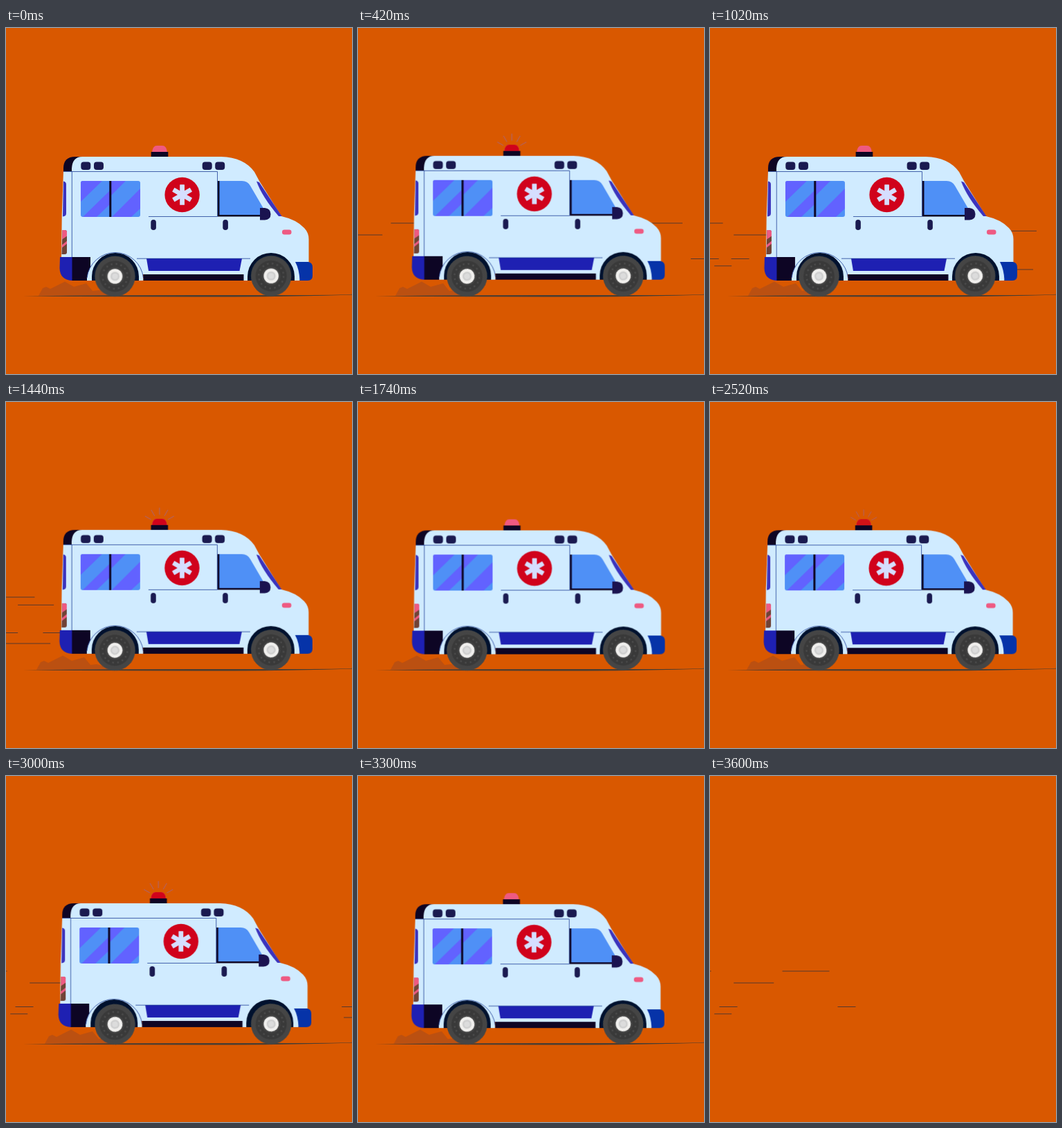
These frames come from a looping animation (500x500 px, 3.63 s). An HTML page:

```html
<!DOCTYPE html>
<html lang="en">
<head>
<meta charset="utf-8">
<title>Ambulance</title>
<style>
html, body { margin: 0; width: 100%; height: 100%; overflow: hidden; background: #d95800; }
svg { display: block; width: 500px; height: 500px; }
.light { fill: #d0ebff; }
.dark { fill: #0d0524; }
.navy { fill: #1a1a50; }
.blue { fill: #1e20b2; }
.indigo { fill: #3b33bd; }
.glass { fill: #4f90f6; }
.violet { fill: #6262ff; }
.pink { fill: #ee5a82; }
.red { fill: #d0021b; }
.arch { fill: #00112e; }
.seam { fill: none; stroke: #1f3f96; stroke-width: .8; }
.streaks { stroke: #55392f; stroke-width: 1; }
.rays { stroke: #a8667c; stroke-width: 1; }

#scene { animation: cut 3630ms step-end infinite; }
#van { animation: jolt 3630ms ease-in-out infinite; }
#dust { animation: drift 3630ms linear infinite; }
.spin { transform-box: fill-box; transform-origin: center; animation: spin 605ms linear infinite; }
.rays, #dome, #glow { animation: 518.571ms linear infinite; }
.rays { transform-origin: 222px 178px; animation-name: rays; }
#dome { animation-name: dome; }
#glow { animation-name: glow; }

@keyframes cut { 0% { visibility: visible } 99.17%, 100% { visibility: hidden } }
@keyframes jolt {
  0% { transform: translate(0, 0) }
  5.8% { transform: translate(.8px, -1.8px) }
  11.57% { transform: translate(.3px, -1.3px) }
  20% { transform: translate(-.8px, -.8px) }
  28.1% { transform: translate(.9px, 0) }
  34% { transform: translate(.4px, -.4px) }
  39.67% { transform: translate(-.2px, -1.2px) }
  48% { transform: translate(.5px, -.5px) }
  56.2% { transform: translate(.2px, -1.3px) }
  65% { transform: translate(.8px, -.4px) }
  74% { transform: translate(-.6px, -1.1px) }
  82.64% { transform: translate(-1.8px, -2.1px) }
  91% { transform: translate(-.3px, -.8px) }
  100% { transform: translate(0, 0) }
}
@keyframes drift {
  0% { transform: translateX(0) }
  11.57% { transform: translateX(7px) }
  28.1% { transform: translateX(8px) }
  39.67% { transform: translateX(-3px) }
  56.2% { transform: translateX(3px) }
  82.64% { transform: translateX(9px) }
  100% { transform: translateX(0) }
}
@keyframes spin { to { transform: rotate(360deg) } }
@keyframes rays {
  0%, 45% { transform: scale(.6); opacity: 0 }
  55% { transform: scale(.75); opacity: 1 }
  75%, 82% { transform: scale(1); opacity: 1 }
  93.3% { transform: scale(.75); opacity: .8 }
  96%, 100% { transform: scale(.6); opacity: 0 }
}
@keyframes dome {
  0%, 82% { opacity: 1 }
  93.3% { opacity: .5 }
  96.5%, 100% { opacity: 1 }
}
@keyframes glow {
  0%, 40% { opacity: 0 }
  52%, 86% { opacity: 1 }
  94%, 100% { opacity: 0 }
}
</style>
</head>
<body>
<svg viewBox="0 0 500 500">
  <defs>
    <g id="s0"><path d="M0 282H68M80 333.5H106"/></g>
    <g id="s1"><path d="M0 299H58M-28 343.8H-3"/></g>
    <g id="s2"><path d="M0 293.3H52M-26 333.5H0M-23 349H47"/></g>
    <g id="s3"><path d="M0 333.5H26"/></g>
    <g id="wheel">
      <circle r="29.2" fill="#454545"/>
      <circle r="22.5" fill="#393939"/>
      <circle r="18" fill="none" stroke="#4c4c4c" stroke-width="2.4" stroke-dasharray="2.4 4.683"/>
      <circle r="13.5" fill="#434343"/>
      <circle r="10.8" fill="#f1f0ee"/>
      <circle r="6.6" fill="#cfcfcf"/>
      <circle r="4" fill="#dcdcdc"/>
    </g>
    <rect id="lamp" class="navy" y="193.5" width="14" height="11.5" rx="4"/>
    <rect id="handle" class="navy" y="277" width="7.6" height="15" rx="3.8"/>
    <rect id="bar" x="-3.4" y="-14.8" width="6.8" height="29.6" rx=".6"/>
    <clipPath id="pane"><rect x="108" y="221" width="86" height="52" rx="3"/></clipPath>
    <clipPath id="tail"><path d="M81.500 292H85Q88 292 88 295V324Q88 327 85 327H80.500Z"/></clipPath>
  </defs>

  <g id="streaks" class="streaks"></g>

  <g id="scene">
    <path id="dust" fill="#bb5011" d="M47 387L53 376 58 374 64 377 85 366.500 98 374 116 369 125 380 134 379 152 384V387Z"/>
    <path fill="#473d33" d="M25 387.400Q180 385.600 330 386T500 384.800V385.500Q420 388 330 388.500Q200 388.600 25 387.600Z"/>

    <g id="van">
      <g class="rays">
        <path d="M222 164V153.800M215 165.900L209.900 157M229 165.900L234.100 157M209.900 171L201 166M234.100 171L243 166"/>
      </g>
      <g id="dome">
        <path class="pink" d="M211 179.500Q212 170 218 170H226Q232 170 233 179.500Z"/>
        <path id="glow" class="red" d="M211 179.500Q212 170 218 170H226Q232 170 233 179.500Z"/>
      </g>
      <rect class="dark" x="209.700" y="179" width="24.600" height="8"/>

      <path class="dark" d="M83 208V203Q83 186 100 186H115V208Z"/>
      <path class="light" d="M95 207V203Q96 186 110 186H311Q344 187 359 208L366 221 398 272Q420 277 431 289Q437.500 296 437.500 305V340L424 365H343V356H198V365H117V333H80Q80 270 83 207Z"/>

      <path class="dark" d="M95 331H122V365H95Z"/>
      <path class="blue" d="M78 331H95.500V365Q78 364 77.500 347Z"/>
      <path class="light" d="M117 365V361A41 41 0 0 1 198.500 361V365Z"/>
      <path class="seam" d="M117 361A41 41 0 0 1 198.500 361"/>
      <path class="dark" d="M198.500 356H343.500V365H198.500Z"/>
      <path class="blue" d="M203 333H341L337.500 351H206Z"/>
      <path fill="#0633a8" d="M418 338H437Q443 339 443 346V358Q443 365 436 365H424.500Q424 349 418 338Z"/>
      <path class="arch" d="M124 365V359A34 34 0 0 1 192 359V365Z"/>
      <path class="arch" d="M349 365V359A34 34 0 0 1 417 359V365Z"/>

      <path class="seam" d="M83 207.500H305.500V272.500H206M95.300 207V331M189 333.200H353"/>

      <g clip-path="url(#pane)">
        <path class="glass" d="M108 221H194V273H108Z"/>
        <path class="violet" d="M108 221H139L108 251ZM151 234V254L131 273H111ZM151 221H173L151 243ZM194 232V261L181 273H153Z"/>
        <path class="dark" d="M149.300 221H152.300V273H149.300Z"/>
      </g>

      <path class="dark" d="M306 221H309V269.500H370V272.500H306Z"/>
      <path class="glass" d="M308.500 221H341Q349 221 353 228L374 264V270H308.500Z"/>
      <path fill="#1a1350" d="M367 260H374Q382.500 261 382.500 269T374 277.500H367Z"/>
      <path class="indigo" d="M362 221.500L366 223 398.500 272H394Q370 244 362 221.500Z"/>
      <path class="indigo" d="M83 221.500Q87 222 87 226V268Q87 272 82 272.500Z"/>

      <use href="#lamp" x="108.300"/><use href="#lamp" x="127"/>
      <use href="#lamp" x="283.700"/><use href="#lamp" x="302.200"/>
      <use href="#handle" x="209.300"/><use href="#handle" x="313.300"/>
      <rect class="pink" x="399" y="291.500" width="13.500" height="7" rx="3.300"/>

      <g clip-path="url(#tail)">
        <path fill="#704336" d="M79 291H89V328H79Z"/>
        <path class="pink" d="M79 291H89V300L79 307ZM79 315L89 307V311L79 319Z"/>
      </g>

      <circle class="red" cx="254.600" cy="241" r="25.200"/>
      <g transform="translate(254.600 241)" fill="#d6deff">
        <use href="#bar"/><use href="#bar" transform="rotate(60)"/><use href="#bar" transform="rotate(120)"/>
      </g>
    </g>

    <g transform="translate(157.500 358.800)"><use href="#wheel" class="spin"/></g>
    <g transform="translate(383.200 358.300)"><use href="#wheel" class="spin"/></g>
  </g>
</svg>
<script>
const LOOP = 3630, SPEED = 1.9, FROM = 560, TO = -250;

// For each streak group: the times (ms) at which it crosses the left edge
const passes = [
  [446, 632, 995, 1427, 2015, 2450, 2966, 3400, 3566, 3656],
  [409, 800, 1039, 2043, 2274, 2600, 3019, 3420, 3619],
  [1242, 1450, 1800, 2800, 3270],
  [1014, 2035]
];

const layer = document.getElementById('streaks');
const shift = x => `translateX(${x}px)`;

function addPass(group, arrival) {
  const use = document.createElementNS('http://www.w3.org/2000/svg', 'use');
  use.setAttribute('href', '#s' + group);
  layer.append(use);
  const start = arrival - FROM / SPEED;
  const end = Math.min(LOOP, arrival - TO / SPEED);
  const last = shift((arrival - end) * SPEED);
  use.animate([
    { transform: shift(FROM), offset: 0 },
    { transform: shift(FROM), offset: start / LOOP },
    { transform: last, offset: end / LOOP },
    { transform: last, offset: 1 }
  ], { duration: LOOP, iterations: Infinity });
}

passes.forEach((times, group) => times.forEach(t => addPass(group, t)));
</script>
</body>
</html>
```
